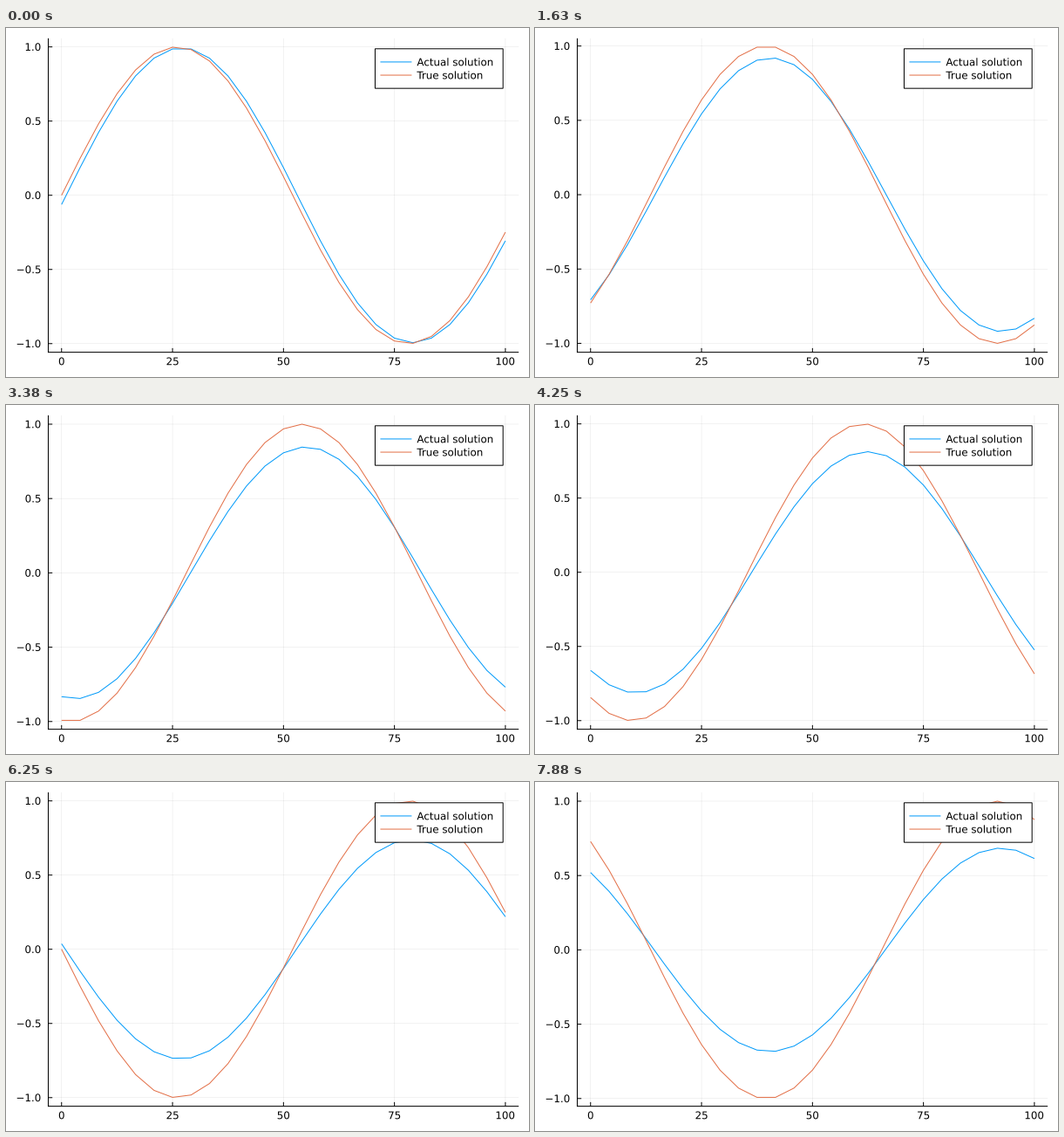
These frames come from a looping animation (600 px wide and 400 px high, 8 s). A matplotlib script:

```python
import matplotlib.pyplot as plt
import numpy as np
from matplotlib.animation import FuncAnimation
from matplotlib.patches import PathPatch, Rectangle
from matplotlib.path import Path
from matplotlib.textpath import TextPath

W, H, DPI = 600, 400, 100
PX = 72 / DPI                      # one pixel in points
FRAMES, INTERVAL = 64, 125
BLUE, ORANGE = "#009AFA", "#E36F47"

# Plot box in pixels, y pointing down
LEFT, RIGHT, TOP, BOTTOM = 48.484, 588.19, 11.811, 371.61
TICK = 4.724
FONT_PX, HALF_CAP = 11.852, 4.32
PAD = 0.03

# Upwind advection of one sine period on a periodic grid
N, CFL = 25, 0.25
theta = 2 * np.pi / N
cells = np.arange(N)
wave = np.exp(1j * theta * cells)
gain = 1 - CFL * (1 - np.exp(-1j * theta))

fig = plt.figure(figsize=(W / DPI, H / DPI), dpi=DPI, facecolor="white")
ax = fig.add_axes([0, 0, 1, 1])
ax.set_xlim(0, W)
ax.set_ylim(H, 0)
ax.axis("off")


def x_px(x):
    return LEFT + (RIGHT - LEFT) * (x / 100 + PAD) / (1 + 2 * PAD)


def stroke(xs, ys, color="black", width=1, alpha=1, z=2):
    line, = ax.plot(xs, ys, color=color, lw=width * PX, alpha=alpha, zorder=z,
                    snap=False, solid_capstyle="butt", solid_joinstyle="miter")
    return line


class Label:
    def __init__(self, text, align, z=2):
        glyphs = TextPath((0, 0), text, size=FONT_PX,
                          prop={"family": "DejaVu Sans"})
        box = glyphs.get_extents()
        shift = {"left": 0, "center": (box.x0 + box.x1) / 2,
                 "right": box.x1}[align]
        self.verts = (glyphs.vertices - [shift, 0]) * [1, -1]
        self.codes = glyphs.codes
        self.patch = PathPatch(Path(self.verts, self.codes), fc="black",
                               lw=0, zorder=z, snap=False)
        ax.add_patch(self.patch)

    def move(self, x, baseline):
        self.patch.set_path(Path(self.verts + [x, baseline], self.codes))


# Axes and fixed x ticks
stroke([LEFT, LEFT], [TOP, BOTTOM + 0.5])
stroke([LEFT - 0.5, RIGHT], [BOTTOM, BOTTOM])
for value in (0, 25, 50, 75, 100):
    x = x_px(value)
    stroke([x, x], [TOP, BOTTOM], width=0.5, alpha=0.1, z=1)
    stroke([x, x], [BOTTOM, BOTTOM - TICK])
    Label(str(value), "center").move(x, 386.23)

# Y ticks follow the changing data limits
y_ticks = []
for value in (-1, -0.5, 0, 0.5, 1):
    y_ticks.append((
        value,
        stroke([LEFT, RIGHT], [0, 0], width=0.5, alpha=0.1, z=1),
        stroke([LEFT, LEFT + TICK], [0, 0]),
        Label(f"{value:.1f}".replace("-", "\u2212"), "right"),
    ))

xs = x_px(100 * cells / (N - 1))
actual = stroke(xs, xs, BLUE, z=3)
true = stroke(xs, xs, ORANGE, z=4)

# Legend
LX, LY, LR, ROW = 423.45, 23.804, 570.19, 15.12
gap, sample = (RIGHT - LEFT) / 90, (RIGHT - LEFT) / 15
ax.add_patch(Rectangle((LX, LY), LR - LX, 3 * ROW, fc="white", ec="black",
                       lw=PX, zorder=5, snap=False))
entries = (("Actual solution", BLUE), ("True solution", ORANGE))
for row, (text, color) in enumerate(entries, 1):
    y = LY + row * ROW
    stroke([LX + gap, LX + gap + sample], [y, y], color, z=6)
    Label(text, "left", z=6).move(LX + 2 * gap + sample, y + HALF_CAP)


def update(k):
    exact = np.sin(theta * (cells - CFL * k))
    numeric = (gain ** (k + 1) * wave).imag
    low = min(exact.min(), numeric.min())
    high = max(exact.max(), numeric.max())
    margin = PAD * (high - low)
    scale = (BOTTOM - TOP) / (high - low + 2 * margin)

    def y_px(v):
        return TOP + (high + margin - v) * scale

    actual.set_ydata(y_px(numeric))
    true.set_ydata(y_px(exact))
    for value, grid, tick, label in y_ticks:
        y = y_px(value)
        grid.set_ydata([y, y])
        tick.set_ydata([y, y])
        label.move(39.48, y + HALF_CAP)
    return []


anim = FuncAnimation(fig, update, frames=FRAMES, interval=INTERVAL,
                     repeat=True, repeat_delay=0, blit=False)
plt.show()
```
